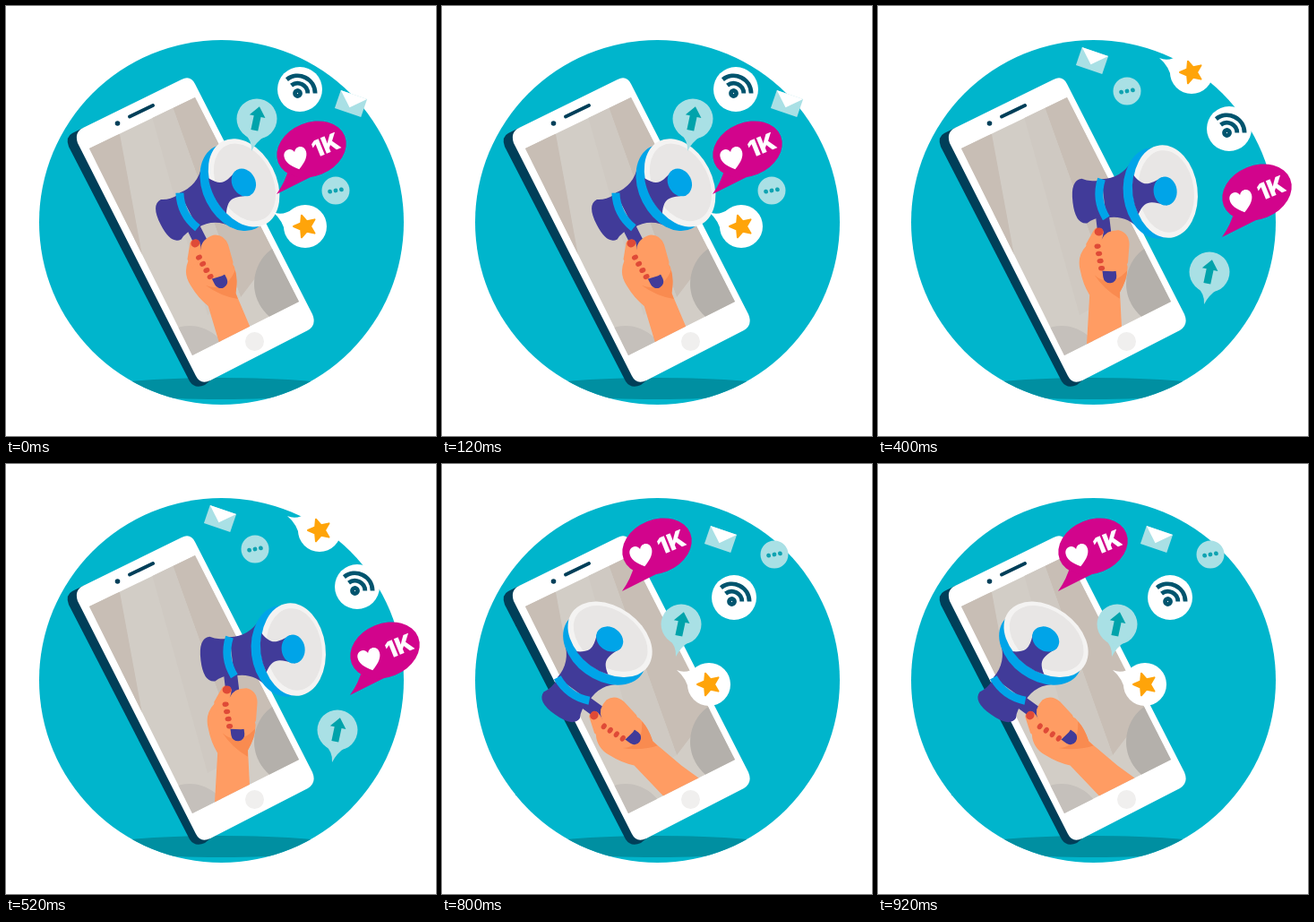
An HTML page for the animation above (1 s loop, 480 px wide and 480 px high).

```html
<!DOCTYPE html>
<html lang="en">
<head>
<meta charset="utf-8">
<title>Megaphone</title>
<style>
html, body { margin: 0; width: 100%; height: 100%; overflow: hidden; background: #fff }
svg { display: block; width: 100%; height: 100% }
text { font: 900 26px Inter, "Open Sans", sans-serif; text-anchor: middle }
</style>
</head>
<body>
<svg viewBox="0 0 480 480">
  <defs>
    <clipPath id="disc"><circle cx="240.5" cy="241.5" r="203.5"/></clipPath>
    <clipPath id="screen"><path d="M93 159L211 102 327 330 208 390Z"/></clipPath>
  </defs>

  <g clip-path="url(#disc)">
    <rect width="480" height="480" fill="#00b5cc"/>
    <ellipse cx="240" cy="427" rx="135" ry="12" fill="#008fa1"/>
  </g>

  <!-- phone -->
  <path fill="#003f59" d="M70 157Q66 146 74 142L86 136 228 418 222 423Q211 428 205 419Z"/>
  <path fill="#fff" d="M80 153Q76 141 86 136L196 82Q206 77 211 87L342 344Q347 356 337 362L228 418Q217 423 212 413Z"/>
  <path stroke="#003f59" stroke-width="4" stroke-linecap="round" d="M138 123.500L164 111"/>
  <circle cx="124.500" cy="131" r="2.800" fill="#003f59"/>
  <circle cx="277.500" cy="374.500" r="10.500" fill="#f0efee"/>
  <g clip-path="url(#screen)">
    <path fill="#d2cdc6" d="M80 90H340V400H80Z"/>
    <path fill="#c8beb5" d="M80 150L127 143 156 300 80 300ZM185 110L215 95 300 275 262 325Z"/>
    <path fill="#cfc9c2" d="M162 120L185 110 262 325 225 345Z"/>
    <circle cx="205" cy="402" r="45" fill="#c5c0bb"/>
    <circle cx="325" cy="310" r="48" fill="#b4b0ab"/>
  </g>

  <!-- arm -->
  <g clip-path="url(#screen)">
    <g class="horn">
      <path fill="#ff9c63" d="M-36 32Q-30 29 -28 35L-8 52 -5 79Q-7 92 -17 106L-20 148V220H-70L-61 160 -51 105Q-57 92 -58 76 -60 60 -48 50Z"/>
      <path fill="#f98b50" d="M-43 83Q-28 101 -6 83 -8 94 -17 106L-18 113Q-34 101 -43 83Z"/>
    </g>
  </g>

  <!-- megaphone, axis along x -->
  <g class="horn">
    <g fill="#413b99">
      <path stroke="#413b99" stroke-width="15" stroke-linecap="round" d="M-26 22V87"/>
      <path d="M-24 -21Q-36 -20 -44 -25 -57 -25 -57 0 -57 25 -44 25 -36 20 -24 21Z"/>
      <path d="M-22 -22Q0 -20 14 -38V40Q0 20 -22 22Z"/>
    </g>
    <path fill="none" stroke="#00a4e8" stroke-width="9" d="M-22 -22Q-32 0 -22 22"/>
    <ellipse cx="36" cy="1" rx="36" ry="51" fill="#00a4e8"/>
    <ellipse cx="47" cy=".5" rx="36" ry="52" fill="#f4f3f2"/>
    <ellipse cx="48" cy=".5" rx="31" ry="46" fill="#e8e6e5"/>
    <path fill="#413b99" d="M14 -22C24 -6 30 -10 47 -16V16C30 10 24 6 14 22A36 52 0 0 1 14 -22Z"/>
    <ellipse cx="47" rx="13" ry="16" fill="#00a4e8"/>
    <path fill="#ff9c63" d="M-30 45Q-24 35 -10 37 1 41 0 54L-4 74Q-8 83 -22 82L-33 80Q-38 77 -35 72 -40 69 -36 64 -41 61 -37 56 -41 51 -34 48Z"/>
    <path fill="#ff9c63" d="M-37 33Q-28 30 -27 37 -29 47 -36 53L-47 59 -48 48Z"/>
    <ellipse cx="-32" cy="36" rx="5" ry="4.500" fill="#df4a37"/>
    <g id="nails" fill="#df4a37"></g>
  </g>

  <!-- bubbles -->
  <g class="mail">
    <g transform="rotate(19)">
      <rect x="-15.500" y="-10.500" width="31" height="21" fill="#a9e0e5"/>
      <path fill="#fff" d="M-15.500 -10.500H15.500L0 4.500Z"/>
    </g>
  </g>
  <g class="dots">
    <circle r="15.500" fill="#a9e0e5"/>
    <g id="typing" fill="#0fa3b1" transform="rotate(-10)"></g>
  </g>
  <g class="arrow">
    <path fill="#a9e0e5" d="M-14 17Q-5 24 -6 36 -1 26 8 20Z"/>
    <circle r="22.500" fill="#a9e0e5"/>
    <path fill="#00a3ab" transform="rotate(12)" d="M0 -14L9 -3H4V13H-4V-3H-9Z"/>
  </g>
  <g class="wifi">
    <circle r="25" fill="#fff"/>
    <g id="waves" transform="translate(-2.500 4.500) rotate(-64)" fill="none" stroke="#00546e" stroke-width="4.800"></g>
  </g>
  <g class="star">
    <path fill="#fff" d="M-22 9Q-24 -6 -36 -16 -25 -11 -13 -20Z"/>
    <circle r="24" fill="#fff"/>
    <polygon id="points" fill="#ffa40a" stroke="#ffa40a" stroke-width="2" stroke-linejoin="round"/>
  </g>
  <g class="like">
    <g fill="#d2048c">
      <path d="M-25 20Q-29 36 -39 50L3 29Z"/>
      <ellipse rx="40" ry="30" transform="rotate(-22)"/>
    </g>
    <g fill="#fff">
      <path transform="translate(-17 10) rotate(-15) scale(.9)" d="M0 14C-10 7 -14 1 -14 -5C-14 -14 -3 -16 0 -8C3 -16 14 -14 14 -5C14 1 10 7 0 14Z"/>
      <text transform="translate(16 -5) rotate(-22)" y="9.500">1K</text>
    </g>
  </g>
</svg>
<script>
const STEP = 200, STEPS = 5;
const byId = id => document.getElementById(id);
const polar = (r, deg) => [r * Math.cos(deg * Math.PI / 180), r * Math.sin(deg * Math.PI / 180)];
const repeat = (n, make) => Array.from({ length: n }, (_, i) => make(i));
const fill = (id, n, make) => byId(id).innerHTML = repeat(n, make).join("");

fill("nails", 4, i => `<ellipse cx="${i / 2 - 35.5}" cy="${52 + 8.3 * i}" rx="3.6" ry="2.7"/>`);
fill("typing", 3, i => `<circle cx="${6.5 * (i - 1)}" r="2.4"/>`);
fill("waves", 3, i => {
  const r = 3 + 8.3 * i;
  return i ? `<path d="M${polar(r, -64)}A${r} ${r} 0 0 1 ${polar(r, 64)}"/>` : `<circle r="${r}"/>`;
});
byId("points").setAttribute("points",
  repeat(10, i => polar(i % 2 ? 6 : 13, i * 36 - 108)).join(" "));

// The arm swings around the elbow: [angle, drop]
const swing = [[-27, 9], [-17, 2], [-7, 0], [-34, 0], [-54, 1]];

// Stops of each bubble: [x, y, turn]
const stops = {
  wifi: [[328, 93], [406, 222], [392, 137], [261, 83], [326, 149]],
  mail: [[385, 109], [386, 54], [239, 61], [334, 77], [311, 84]],
  arrow: [[280, 126], [441, 171], [370, 297], [398, 56], [267, 179]],
  like: [[341, 160], [313, 83], [423, 208], [378, 212, 54], [240, 92]],
  dots: [[368, 206], [365, 184], [278, 95], [382, 132], [371, 101]],
  star: [[334, 246], [391, 130], [350, 74], [322, 147, -82], [298, 246]]
};

function place(name, transform) {
  for (const node of document.querySelectorAll("." + name))
    node.setAttribute("transform", transform);
}

function draw() {
  const step = Math.floor(performance.now() / STEP) % STEPS;
  const [angle, drop] = swing[step];
  place("horn", `translate(240 ${354 + drop}) rotate(${angle}) translate(51 -136.5)`);
  for (const name in stops) {
    const [x, y, turn = 0] = stops[name][step];
    place(name, `translate(${x} ${y}) rotate(${turn})`);
  }
  requestAnimationFrame(draw);
}
draw();
</script>
</body>
</html>
```
